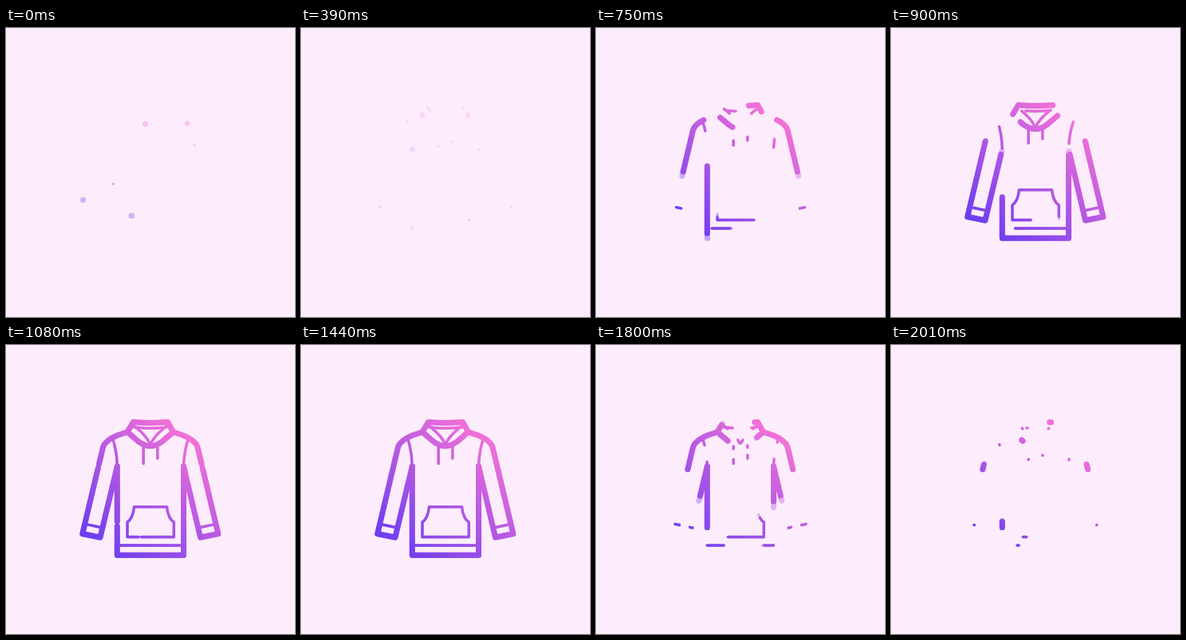
An HTML page for the animation above (2.04 s loop, 362x362 px).

```html
<!DOCTYPE html>
<html lang="en">
<head>
<meta charset="utf-8">
<title>Hoodie line drawing</title>
<style>
html, body { margin: 0; width: 100%; height: 100%; overflow: hidden; background: #fdecfb; }
svg { display: block; width: 100vw; height: 100vh; }
.line { fill: none; stroke: url(#ink); stroke-linecap: round; stroke-linejoin: round; }
</style>
</head>
<body>
<svg viewBox="0 0 362 362">
  <defs>
    <linearGradient id="ink" gradientUnits="userSpaceOnUse" x1="110" y1="250" x2="225" y2="110">
      <stop offset="0" stop-color="#6c3cf0"/>
      <stop offset="1" stop-color="#f271d7"/>
    </linearGradient>
  </defs>
  <g id="dots">
    <g fill="#ceb2fa">
      <circle cx="96.5" cy="215.3" r="3.6"/>
      <circle cx="157.3" cy="235.3" r="3.8"/>
      <circle cx="134" cy="195.3" r="1.8"/>
    </g>
    <g fill="#f6c4ef">
      <circle cx="174.5" cy="120" r="3.6"/>
      <circle cx="227" cy="119.6" r="3.4"/>
      <circle cx="236" cy="146.3" r="1.6"/>
    </g>
  </g>
  <g id="ghost" class="line" opacity=".4"></g>
  <g id="solid" class="line"></g>
</svg>
<script>
const LOOP = 2040, STEP = 30;
const thick = [
  "M139.3 152V263.3H222.5V152",                                      // body
  "M152 109L140 113Q124.5 119 121.5 128L95.8 236.5L118 241L139.3 152", // sleeves
  "M209.5 109L221.5 113Q237 119 240 128L265.8 236.5L243.5 241L222.5 152",
  "M152 109L166 121Q180.75 132 195.5 121L209.5 109",                  // hood
  "M209.5 109L202.5 96.5Q180.75 98.5 159.5 96.5L152 109"
];
const thin = [
  "M158.5 100Q174 111 180 123",                                       // collar
  "M203.5 100Q188 111 181.5 123",
  "M161 103Q180.75 105.5 201 103",
  "M172.2 148.5V127",                                                 // strings
  "M189.8 142V126",
  "M133.5 117Q139 133 139.3 152",                                     // seams
  "M222.5 152Q223 133 228.5 117",
  "M99 224.3L121 229",                                                // cuffs
  "M263 224.3L241 229",
  "M210.3 240.5H152V222Q159 217 160.5 202.7H201.5Q203 217 210.3 222Z", // pocket
  "M139.3 251H222.5"                                                  // hem
];

const $ = id => document.getElementById(id);
const clamp = v => Math.min(1, Math.max(0, v));

function addPaths(group, list, width) {
  for (const d of list) {
    const path = document.createElementNS("http://www.w3.org/2000/svg", "path");
    path.setAttribute("d", d);
    path.setAttribute("pathLength", 1);
    path.setAttribute("stroke-width", width);
    group.append(path);
  }
}
for (const id of ["ghost", "solid"]) {
  addPaths($(id), thick, 7);
  addPaths($(id), thin, 3.4);
}

// Symmetric cubic-bezier(2/3, 0, 1/3, 1), solved by bisection.
function ease(x) {
  if (x <= 0) return 0;
  if (x >= 1) return 1;
  let lo = 0, hi = 1, s;
  for (let i = 0; i < 24; i++) {
    s = (lo + hi) / 2;
    const u = 1 - s;
    if (2 * s * u * u + s * s * u + s ** 3 < x) lo = s; else hi = s;
  }
  return s * s * (3 - 2 * s);
}

// The drawn part slides a quarter along each path while it grows.
function trim(group, t) {
  const grow = ease((t - 436) / 756);
  const erase = ease((t - 1430) / 690);
  const start = grow / 4 + erase;
  const length = Math.max(0, grow - erase);
  group.setAttribute("stroke-dasharray", `${length} ${1 - length}`);
  group.setAttribute("stroke-dashoffset", -(start % 1));
}

function frame(now) {
  const t = Math.floor(now % LOOP / STEP) * STEP;
  const drawing = t >= 390;
  $("dots").setAttribute("opacity", t < 30 ? 1 : t < 60 ? 0.4 : 0);
  $("solid").setAttribute("opacity", drawing ? clamp(0.15 + (t - 390) / 70) : 0);
  $("ghost").setAttribute("opacity", t >= 450 ? 0.4 : 0);
  trim($("solid"), t);
  trim($("ghost"), t < 1300 ? t + 6 : t - 6);
  requestAnimationFrame(frame);
}
frame(performance.now());
</script>
</body>
</html>
```
